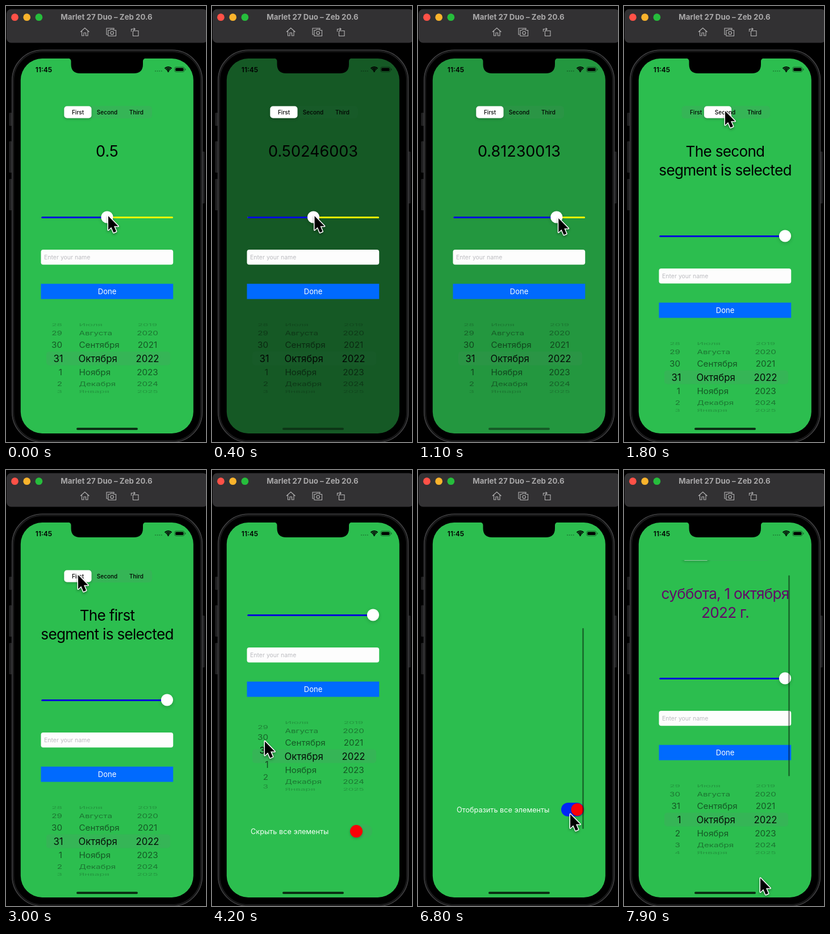
Animation of 352x764 px, one loop 8000 ms. Source, as an HTML page with a canvas:

```html
<!DOCTYPE html>
<html lang="en">
<head>
<meta charset="utf-8">
<style>
  html, body { margin: 0; width: 100%; height: 100%; overflow: hidden; background: #000; }
  canvas { display: block; width: 100vw; height: 100vh; }
</style>
</head>
<body>
<canvas id="stage" width="352" height="764"></canvas>
<script>
const g = document.getElementById('stage').getContext('2d');
const LOOP = 8000, STEP = 100, HOLD = 500;
const GREEN = [44, 190, 79];
const MONTHS = ['Января', 'Февраля', 'Марта', 'Апреля', 'Мая', 'Июня', 'Июля',
  'Августа', 'Сентября', 'Октября', 'Ноября', 'Декабря'];
const VIEW = { top: 158, bottom: 724 };
const SPAN = 211, TAB = 51.5, ROW = 24, LINE = 33;
const TAU = Math.PI * 2;

// Each gesture starts at (x, y) and changes one control by an amount
const gestures = [
  { at: 300, kind: 'slide', by: .01230013, x: 180, y: 368 },
  { at: 800, kind: 'slide', by: .5, x: 184, y: 372 },
  { at: 1700, kind: 'tab', by: 1, x: 178, y: 184 },
  { at: 2200, kind: 'tab', by: 1, x: 230, y: 184 },
  { at: 2800, kind: 'tab', by: -2, x: 127, y: 184 },
  { at: 3300, kind: 'scroll', by: 149, x: 105, y: 620 },
  { at: 4000, kind: 'turn', by: 1, x: 93, y: 485 },
  { at: 5000, kind: 'scroll', by: -147, x: 139, y: 430 },
  { at: 5700, kind: 'scroll', by: 185, x: 150, y: 650 },
  { at: 6400, kind: 'flip', by: 1, x: 268, y: 603 },
  { at: 6900, kind: 'flip', by: -1, x: 268, y: 603 },
  { at: 7400, kind: 'scroll', by: -149, x: 240, y: 566 }
];
// Pointer travel per unit of change
const travel = { slide: [SPAN, 0], scroll: [0, -1], turn: [0, -ROW], tab: [0, 0], flip: [0, 0] };

const ramp = (t, from, length) => Math.min(1, Math.max(0, (t - from) / length));
const easeOut = p => 1 - (1 - p) ** 2;
const total = (kind, t, length = HOLD, ease = p => p) => gestures
  .filter(k => k.kind === kind && k.at <= t)
  .reduce((sum, k) => sum + k.by * ease(ramp(t, k.at, length)), 0);

function pointer(t) {
  const i = Math.max(0, gestures.findLastIndex(k => k.at <= t));
  const a = gestures[i], b = gestures[i + 1] || a;
  const [dx, dy] = travel[a.kind].map(d => d * a.by * ramp(t, a.at, HOLD));
  const x = a.x + dx, y = a.y + dy;
  const glide = b === a ? 0 : ramp(t, a.at + HOLD, b.at - a.at - HOLD);
  return [x + (b.x - x) * glide, y + (b.y - y) * glide];
}

function box(x, y, w, h, r, fill, stroke, line = 1) {
  g.beginPath();
  g.roundRect(x, y, w, h, r);
  if (fill) { g.fillStyle = fill; g.fill(); }
  if (stroke) { g.strokeStyle = stroke; g.lineWidth = line; g.stroke(); }
}

function dot(x, y, r, fill) {
  g.beginPath();
  g.arc(x, y, r, 0, TAU);
  g.fillStyle = fill;
  g.fill();
}

// Text is centred vertically on its capitals
function text(s, x, y, size, { color = '#000', align = 'center', weight = 400, gap = 0 } = {}) {
  g.font = `${weight} ${size}px Inter, Roboto, sans-serif`;
  g.textAlign = align;
  g.letterSpacing = gap + 'px';
  g.fillStyle = color;
  g.fillText(s, x, y + size * .36);
}

function shadowed(draw, blur = 4, dy = 2, alpha = .2) {
  g.save();
  g.shadowColor = `rgba(0,0,0,${alpha})`;
  g.shadowBlur = blur;
  g.shadowOffsetY = dy;
  draw();
  g.restore();
}

function toolbar() {
  box(1, 5.5, 354, 59, 8, '#323133');
  ['#ff5147', '#f9b32c', '#26bd3c'].forEach((c, i) => dot(15.5 + i * 21.2, 19.7, 6.4, c));
  text('Marlet 27 Duo – Zeb 20.6', 177, 19.5, 13.3, { color: '#a9a8a9', weight: 700 });
  g.strokeStyle = '#b5b4b5';
  g.lineWidth = 1.1;
  g.stroke(new Path2D('M131 45.5L138.7 38.5L146.5 45.5M133.5 44V52H137V47H140.5V52H144V44'));
  g.stroke(new Path2D('M179 50H177V39H190V41M180 42.5H183L184 41H189L190 42.5H193.5V52.5H180Z'));
  g.beginPath();
  g.arc(186.7, 47.2, 2.7, 0, TAU);
  g.stroke();
  g.stroke(new Path2D('M223.5 43.5H233V52.5H223.5ZM220.5 45V40.5H227M224.8 38.3L227.2 40.5L224.8 42.7'));
}

function phone(bg) {
  [[187, 23], [237, 55], [303, 55]].forEach(([y, h]) => box(5.5, y, 5, h, 1.5, '#222223'));
  box(345, 255, 4.5, 91, 1.5, '#222223');
  box(10.8, 77.3, 334.6, 687, 53, '#000', '#434345', 1.6);
  box(13.2, 79.7, 329.8, 682.2, 50.5, null, '#1c1c1d', 2);
  box(25.8, 92, 304, 657, 38, bg);
  g.fillStyle = '#000';
  g.fill(new Path2D('M109 91.5Q114.5 92 114.5 97V102Q114.5 118 130.5 118H225Q241 118 241 102V97Q241 92 246.5 91.5Z'));
}

function statusBar(dark) {
  text('11:45', 66.5, 111.5, 12, { weight: 600 });
  for (let i = 0; i < 4; i++) dot(263 + i * 3.6, 114, 1.1, 'rgba(0,0,0,.3)');
  g.strokeStyle = '#000';
  g.lineWidth = 1.9;
  for (let r = 3.1; r < 9; r += 2.7) {
    g.beginPath();
    g.arc(285.5, 115.5, r, -Math.PI * .75, -Math.PI * .25);
    g.stroke();
  }
  dot(285.5, 114.7, 1.3, '#000');
  box(296.8, 107, 17, 8.5, 2.6, null, 'rgba(0,0,0,.45)');
  box(298.2, 108.4, 14.2, 5.7, 1.5, '#000');
  box(315, 109.6, 1.3, 3.2, .6, 'rgba(0,0,0,.45)');
  box(124, 739, 108, 4, 2, `rgba(0,0,0,${dark ? .4 : .75})`);
}

// Rows sit on a cylinder seen from the front
function wheel(x, cy, align, offset, name) {
  const angle = 22 * Math.PI / 180, base = Math.round(offset);
  const side = { right: -1.5, left: 1, center: 0 }[align];
  for (let i = -4; i <= 4; i++) {
    const o = base + i - offset, turn = o * angle;
    if (Math.abs(turn) > 1.3) continue;
    const y = 64 * Math.sin(turn), far = Math.min(1, Math.abs(o));
    const alpha = Math.abs(y) < 13 ? .93 : .55 - .17 * (Math.abs(o) - 1);
    g.save();
    g.translate(x + side * far, cy + y);
    g.scale(1, Math.cos(turn));
    text(name(base + i), 0, 0, 16.7 - 1.5 * far, { align, color: `rgba(0,0,0,${alpha})` });
    g.restore();
  }
}

const tint = shade => `rgba(118,118,128,${.13 * shade ** 2})`;

function picker(cy, day, shade) {
  box(71, cy - 12, 218, ROW, 5, tint(shade));
  wheel(100.5, cy, 'right', day, n => String((n + 61) % 31 + 1));
  wheel(127.5, cy, 'left', 0, n => MONTHS[(n + 21) % 12]);
  wheel(249, cy, 'center', 0, n => String(2022 + n));
}

function segments(y, pos, shade) {
  box(101.5, y - 11, 155.5, 22, 6, tint(shade));
  shadowed(() => box(102.3 + pos * TAB, y - 10.5, 48.2, 21, 5, '#fff'));
  ['First', 'Second', 'Third'].forEach((s, i) => text(s, 126.5 + i * TAB, y, 10, { weight: 500 }));
}

function slider(y, value) {
  const x = 72.5 + value * SPAN;
  box(62, y - 1, 232, 3.1, 1.5, '#f8f500');
  box(62, y - 1, x - 62, 3.1, 1.5, '#0508d8');
  shadowed(() => dot(x, y, 10.6, '#fff'), 6);
}

function caption(t, value) {
  if (total('turn', t) === 1) return ['суббота, 1 октября', '2022 г.'];
  const tab = total('tab', t, 1e-6, Math.ceil);
  if (t >= 1700) return ['The ' + ['first', 'second', 'third'][Math.round(
    gestures.reduce((n, k) => n + (k.kind === 'tab' && k.at <= t ? k.by : 0), 0))],
    'segment is selected'];
  return [value === 1 ? '1.0' : String(+value.toFixed(8))];
}

function controls(t, value, scroll, shade) {
  const lines = caption(t, value), two = lines.length > 1;
  const color = total('turn', t) === 1 ? '#620a68' : '#000';
  const y = (two ? LINE : 0) - scroll;
  segments(186 - scroll, total('tab', t, 200, easeOut), shade);
  lines.forEach((s, i) => text(s, 178, 254 - scroll + two + i * 32.5, two ? 26.1 : 27,
    { color, gap: two ? -.7 : 0 }));
  slider(370 + y, value);
  box(61.5, 427 + y, 232.7, 26.3, 4, '#fdfdfd');
  text('Enter your name', 67, 440 + y, 10.5, { color: '#bcbcc0', align: 'left' });
  box(61.5, 486.7 + y, 232.7, 26.8, 0, '#006afe');
  text('Done', 178, 500 + y, 13, { color: '#fff' });
  picker(617.5 + y, total('turn', t), shade);
}

function toggle(y, p) {
  const on = p > .5, x = on ? 252 : 242;
  text(on ? 'Отобразить все элементы' : 'Скрыть все элементы', 68, y, 12.7,
    { color: '#f4fff6', align: 'left' });
  box(x, y - 12, 40, 24, 12, on ? '#0026f5' : tint(1));
  shadowed(() => dot(x + 12 + p * 16.5, y, 11, '#fb0007'));
}

function scrollBar(t, scroll) {
  if ((t > 3300 && t < 4100) || t > 5000)
    box(289.2, 160.8 + scroll * .622, 2.6, 352, 1.3, 'rgba(0,0,0,.45)');
}

function cursor(x, y) {
  const arrow = new Path2D('M0 0V24.5L5.3 19.5L9.4 29L14 27L10 17.8H17.4Z');
  g.save();
  g.translate(x, y);
  g.lineWidth = 3;
  g.lineJoin = 'round';
  g.strokeStyle = '#fff';
  shadowed(() => g.stroke(arrow), 4, 2, .4);
  g.fillStyle = '#000';
  g.fill(arrow);
  g.restore();
}

function draw(t) {
  const value = Math.min(1, .5 + total('slide', t));
  const scroll = total('scroll', t), flip = total('flip', t, 200);
  const shade = value > .5 ? value ** 1.1 : 1;
  g.fillStyle = '#000';
  g.fillRect(0, 0, 352, 764);
  toolbar();
  phone(`rgb(${GREEN.map(c => Math.round(c * shade))})`);
  statusBar(shade < .8);
  g.save();
  g.beginPath();
  g.rect(26, VIEW.top, 304, VIEW.bottom - VIEW.top);
  g.clip();
  if (flip <= .5) controls(t, value, scroll, shade);
  toggle(782 - scroll, flip);
  scrollBar(t, scroll);
  g.restore();
  cursor(...pointer(t));
}

const start = performance.now();
function tick() {
  const t = (performance.now() - start) % LOOP;
  draw(Math.floor(t / STEP) * STEP);
  requestAnimationFrame(tick);
}
tick();
</script>
</body>
</html>
```
